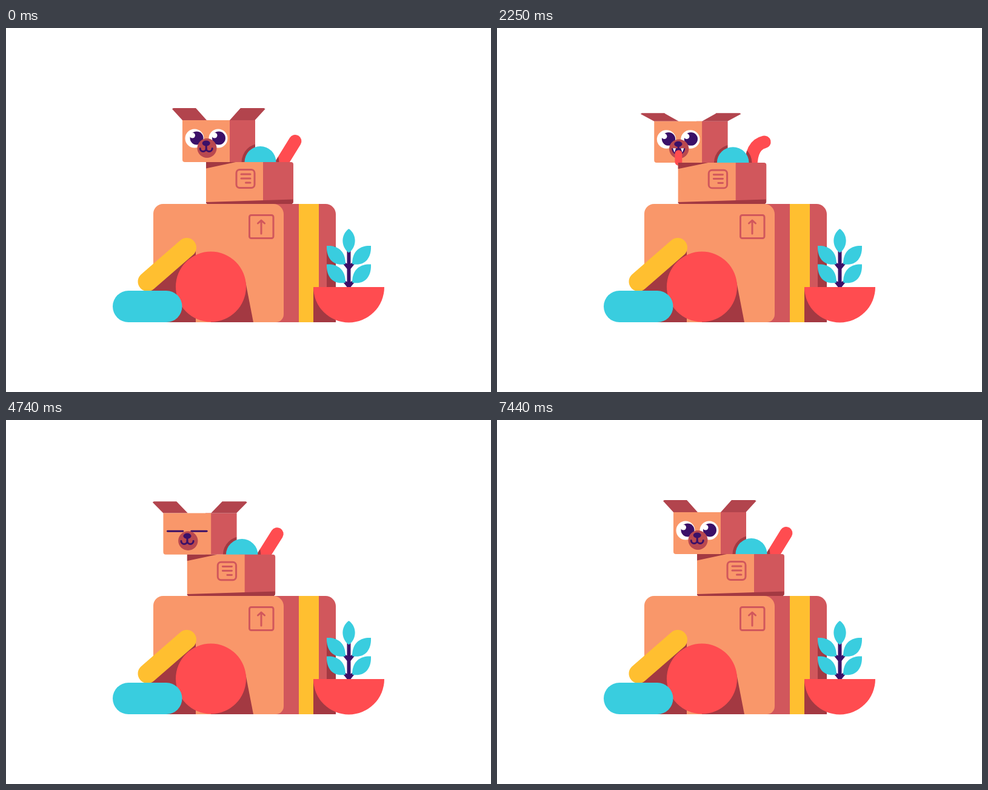
Write an HTML page with a canvas that moves like this. It is 800 px wide and 600 px high and loops after 7.47 s.

```html
<!DOCTYPE html>
<html lang="en">
<head>
<meta charset="utf-8">
<title>Box pup</title>
<style>
  html, body { margin: 0; width: 100%; height: 100%; overflow: hidden; background: #fff; }
  canvas { display: block; width: 800px; height: 600px; }
</style>
</head>
<body>
<canvas id="stage"></canvas>
<script>
const LOOP = 7470, TAU = Math.PI * 2, SHIFT = -30.5, PANT = 318;
const C = {
  front: '#f9976a', side: '#d1575c', dark: '#a33942', muzzle: '#b9484f',
  red: '#ff4c50', blue: '#39cddf', yellow: '#ffbf30', ink: '#3b1068', white: '#fff'
};
const canvas = document.getElementById('stage');
const g = canvas.getContext('2d');
const dpr = window.devicePixelRatio || 1;
canvas.width = 800 * dpr;
canvas.height = 600 * dpr;

const clamp = v => Math.max(0, Math.min(1, v));
const lerp = (a, b, k) => a + (b - a) * k;
const ramp = (t, a, b) => { const k = clamp((t - a) / (b - a)); return k * k * (3 - 2 * k); };
const during = (t, a, b, fade) => ramp(t, a, a + fade) - ramp(t, b - fade, b);
const bump = (t, mid, half) => Math.cos(clamp(Math.abs(t - mid) / half) * Math.PI / 2) ** 2;

// hop profile: time, squash, lift, ear fold, travel
const HOP = [
  [0, 0, 0, 0, 0], [200, 1, 0, 1, 0], [300, -.15, 0, 1.2, .1], [390, 0, 1, -1, .5],
  [500, 0, .36, -1, 1], [600, 1, 0, 2, 1], [720, 0, 0, 0, 1]
];
// start, active from, active until, height, x from, x to
const HOPS = [
  [480, 480, 1200, 45, 0, SHIFT],
  [3570, 3570, 4170, 22, SHIFT, SHIFT],
  [3970, 4170, 4690, 30, SHIFT, SHIFT],
  [4710, 4710, 5430, 45, SHIFT, 0]
];

function hopAt(t) {
  const hop = HOPS.find(h => t >= h[1] && t < h[2]);
  if (!hop) return { q: 0, lift: 0, ear: 0, x: t >= 1200 && t < 4710 ? SHIFT : 0 };
  const d = t - hop[0];
  const i = Math.max(1, HOP.findIndex(r => r[0] > d));
  const a = HOP[i - 1], b = HOP[i], k = ramp(d, a[0], b[0]);
  const v = n => lerp(a[n], b[n], k);
  return { q: v(1), lift: hop[3] * v(2), ear: v(3), x: lerp(hop[4], hop[5], v(4)) };
}

function poseAt(t) {
  const p = hopAt(t);
  p.phase = t < 4000 ? (t - 1440) / PANT : (t - 6390) / PANT + .22;
  const wave = o => Math.cos(TAU * (p.phase - o));
  p.pant = during(t, 1140, 3150, 90) + during(t, 5370, 7150, 90);
  const dip = bump(t, 3180, 100) + bump(t, 7180, 100);
  p.big = clamp((p.q - .45) / .55);
  p.q += p.pant * (-.02 - .1 * wave(0)) + .38 * dip;
  p.ear += p.pant * Math.min(1, .6 - .6 * wave(.25)) + .9 * dip * (1 - p.pant);
  p.wag = 463 + 16 * wave(.72);
  p.tongue = 224 - 2 * wave(0);
  p.ball = hopAt(Math.max(0, t - 45)).lift;
  p.ball = Math.max(p.lift, p.ball);
  p.mouth = during(t, 1190, 3130, 60) + during(t, 5420, 7130, 60);
  p.bark = clamp(during(t, 780, 1040, 80) + during(t, 3850, 4120, 80) +
    during(t, 4260, 4520, 80) + during(t, 5000, 5260, 80));
  p.shut = clamp(during(t, 520, 1160, 60) + during(t, 3590, 5420, 60) +
    bump(t, 3215, 75) + bump(t, 7365, 75));
  return p;
}

function fill(color, draw) {
  g.fillStyle = color;
  g.beginPath();
  draw();
  g.fill();
}
function line(color, width, draw) {
  g.strokeStyle = color;
  g.lineWidth = width;
  g.beginPath();
  draw();
  g.stroke();
}
function poly(color, ...pts) {
  fill(color, () => { for (let i = 0; i < pts.length; i += 2) g.lineTo(pts[i], pts[i + 1]); });
}
const rect = (color, x, y, w, h, r = 0) => fill(color, () => g.roundRect(x, y, w, h, r));
const disc = (color, x, y, rx, ry = rx) => fill(color, () => g.ellipse(x, y, rx, ry, 0, 0, TAU));
const seg = (x1, y1, x2, y2) => { g.moveTo(x1, y1); g.lineTo(x2, y2); };
function group(draw) { g.save(); draw(); g.restore(); }

function drawTail(p) {
  const air = clamp(p.lift / 22);
  const angle = lerp(.553, .235, air);
  const bx = lerp(447, 450.5, air), by = 235 - 1.55 * p.lift;
  const k = p.pant;
  const tx = lerp(bx + 57 * Math.sin(angle), p.wag, k);
  const ty = lerp(by - 57 * Math.cos(angle), 181 + Math.max(0, p.wag - 455) * .35, k);
  const cx = lerp((bx + tx) / 2, 451 - (p.wag - 455) * .25, k);
  const cy = lerp((by + ty) / 2, 192, k);
  line(C.red, 21, () => {
    g.moveTo(lerp(bx, 449, k), by);
    g.quadraticCurveTo(cx, cy, tx, ty);
  });
}

// ear flap tip offset by fold: upright, resting, spread, drooping
function earTip(e) {
  if (e < 0) return [lerp(-17, 1, -e), -20];
  if (e < 1) return [lerp(-17, -23.5, e), lerp(-20, -12, e)];
  return [lerp(-23.5, -22, e - 1), lerp(-12, 25, e - 1)];
}
function drawEar(x, w, dir, e) {
  const [dx, dy] = earTip(e);
  const k = clamp(Math.max(-e, e - 1));
  const color = `rgb(${lerp(178, 197, k)},${lerp(68, 76, k)},${lerp(77, 83, k)})`;
  const ox = x - dir * w, tip = x + dir * -dx * -1 * -1;
  const far = x - dir * dx, near = ox - dir * dx;
  g.lineJoin = 'round';
  poly(color, x, 152, ox, 152, near, 152 + dy + 1, near + dir, 152 + dy,
    far - dir * 2, 152 + dy, far, 152 + dy + 1.5);
}

function drawEye(x, px, shut) {
  if (shut > .88) {
    line(C.ink, 3, () => seg(x - 13, 182, x + 12, 182));
    return;
  }
  group(() => {
    g.translate(x, 182);
    g.scale(1, 1 - shut);
    disc(C.white, 0, 0, 15.5);
    disc(C.ink, px, -.5, 11);
    disc(C.white, px - 7, -5, 4.5);
  });
}

function drawMouth(p) {
  const b = p.bark, m = p.mouth;
  disc(C.muzzle, 331.5, 198, 16 + 4 * b);
  if (b > .2) {
    line(C.ink, 3, () => seg(329.5, 182, 329.5, 194));
    group(() => {
      g.beginPath();
      g.arc(329.5, 204, 12 * b, 0, TAU);
      g.clip();
      rect(C.ink, 310, 185, 40, 40);
      disc(C.red, 337.5, 212, 11);
    });
  } else if (m > .2) {
    fill(C.ink, () => g.ellipse(330.5, 197, 11, 11 * m, 0, 0, Math.PI));
    line(C.ink, 3, () => seg(330.5, 190, 330.5, 198));
    for (const x of [321.5, 334.5]) poly(C.white, x, 197, x + 5, 197, x + 2.5, 197 + 7 * m);
    rect(C.red, 324.8, 200, 11.8, Math.max(6, (p.tongue - 200) * m), 5.8);
  } else {
    line(C.ink, 3, () => {
      g.arc(325.2, 198.5, 5, Math.PI, 0, true);
      g.arc(335.2, 198.5, 5, Math.PI, 0, true);
    });
    line(C.ink, 3, () => seg(330.2, 190, 330.2, 198));
  }
  disc(C.ink, 330.2, 190 - 8 * b, 6.5, 4.6);
}

function drawHead(p) {
  group(() => {
    g.translate(0, -p.lift);
    drawEar(291, 40, -1, p.ear);
    rect(C.side, 360, 152, 51, 69, [0, 0, 3, 0]);
    rect(C.front, 291, 152, 78, 69, [0, 0, 0, 4]);
    drawEar(410.5, 41.5, 1, p.ear);
    drawEye(311, 3.5, p.shut);
    drawEye(350, 1, p.shut);
    drawMouth(p);
  });
}

function drawMiddle(p) {
  const up = p.lift * .33;
  group(() => {
    g.translate(0, -up);
    rect(C.side, 415, 221, 59, 69, [0, 4, 4, 0]);
    rect(C.front, 330, 221, 94, 69, [0, 0, 0, 3]);
    const near = 1 - clamp((p.lift - up) / 8), low = 1 - clamp(up / 5);
    poly(C.dark, 330, 221, 330 + 49 * near, 221, 330, 221 + 10.5 * near);
    if (low > 0) {
      poly(C.dark, 330, 290 - 3 * low, 473.5, 290 - 7.5 * low, 473.5, 288, 471.5, 290, 332, 290, 330, 288.5);
    }
    line(C.side, 3, () => g.roundRect(380, 233.5, 30, 30, 5.5));
    line(C.side, 3, () => {
      seg(388, 241, 403, 241);
      seg(388, 248, 403, 248);
      seg(395.5, 255, 403, 255);
    });
  });
}

function drawUpper(p, top) {
  group(() => {
    g.translate(402 + p.x, top);
    g.scale(1 + .15 * p.q, 1 - .18 * p.q);
    g.translate(-402, -290);
    drawTail(p);
    drawHead(p);
    // the ball shades only what is already painted
    g.globalCompositeOperation = 'source-atop';
    disc(C.dark, 419.5, 221.5 - p.ball, 31);
    g.globalCompositeOperation = 'source-over';
    disc(C.blue, 419.5, 221 - p.ball, 26);
    drawMiddle(p);
  });
}

function drawBigBox(k) {
  group(() => {
    g.translate(393.5, 485);
    g.scale(1 + .05 * k, 1 - .072 * k);
    g.translate(-393.5, -485);
    rect(C.side, 400, 290, 144, 195, [0, 17, 0, 0]);
    rect(C.yellow, 483, 290, 33, 195);
    rect(C.front, 243, 290, 215, 195, [16, 17, 13, 0]);
    line(C.side, 3, () => g.roundRect(401.5, 308.5, 39.5, 38, 3));
    line(C.side, 3, () => {
      seg(421, 317.5, 421, 339);
      g.moveTo(415.5, 322);
      g.lineTo(421, 317);
      g.lineTo(426.5, 322);
    });
  });
}

function drawLeaf(x, y, dir) {
  group(() => {
    g.translate(x, y);
    g.scale(dir, 1);
    fill(C.blue, () => {
      g.moveTo(0, 0);
      g.bezierCurveTo(14, -1, 31, 5, 31, 30);
      g.bezierCurveTo(14, 34, -1, 24, 0, 0);
    });
  });
}

function drawProps(k) {
  const edge = 544 + 7.5 * k;
  poly(C.dark, 313, 362, 313, 485, 250, 485, 236, 432);
  poly(C.dark, 338, 485, 338, 400, 395, 418, 408, 485);
  disc(C.red, 338, 426.5, 58);
  line(C.yellow, 32, () => seg(233.5, 418, 298, 362));
  rect(C.blue, 176, 433, 114.5, 52, 26);

  rect(C.dark, 529, 360, edge - 529, 68);
  rect(C.dark, 507, 427, edge - 507, 58);
  rect(C.ink, 562.5, 366, 6, 62);
  for (const y of [389, 419]) {
    poly(C.ink, 556, y, 560, y - 2, 565.5, y + 1, 571, y - 2, 575, y, 568.5, y + 8, 562.5, y + 8);
  }
  fill(C.blue, () => {
    g.moveTo(565.5, 331);
    g.bezierCurveTo(579, 340, 579, 361, 565.5, 370.5);
    g.bezierCurveTo(552, 361, 552, 340, 565.5, 331);
  });
  for (const y of [359, 389.5]) {
    drawLeaf(529, y, 1);
    drawLeaf(602, y, -1);
  }
  fill(C.red, () => g.arc(565.5, 427, 58.5, 0, Math.PI));
}

function frame(now) {
  const p = poseAt(now % LOOP);
  g.setTransform(dpr, 0, 0, dpr, 0, 0);
  g.clearRect(0, 0, 800, 600);
  g.lineCap = g.lineJoin = 'round';
  drawUpper(p, 290 + 14 * p.big);
  drawBigBox(p.big);
  drawProps(p.big);
  requestAnimationFrame(frame);
}
const start = performance.now();
const tick = frame;
requestAnimationFrame(() => tick(Math.max(0, performance.now() - start)));
</script>
</body>
</html>
```
